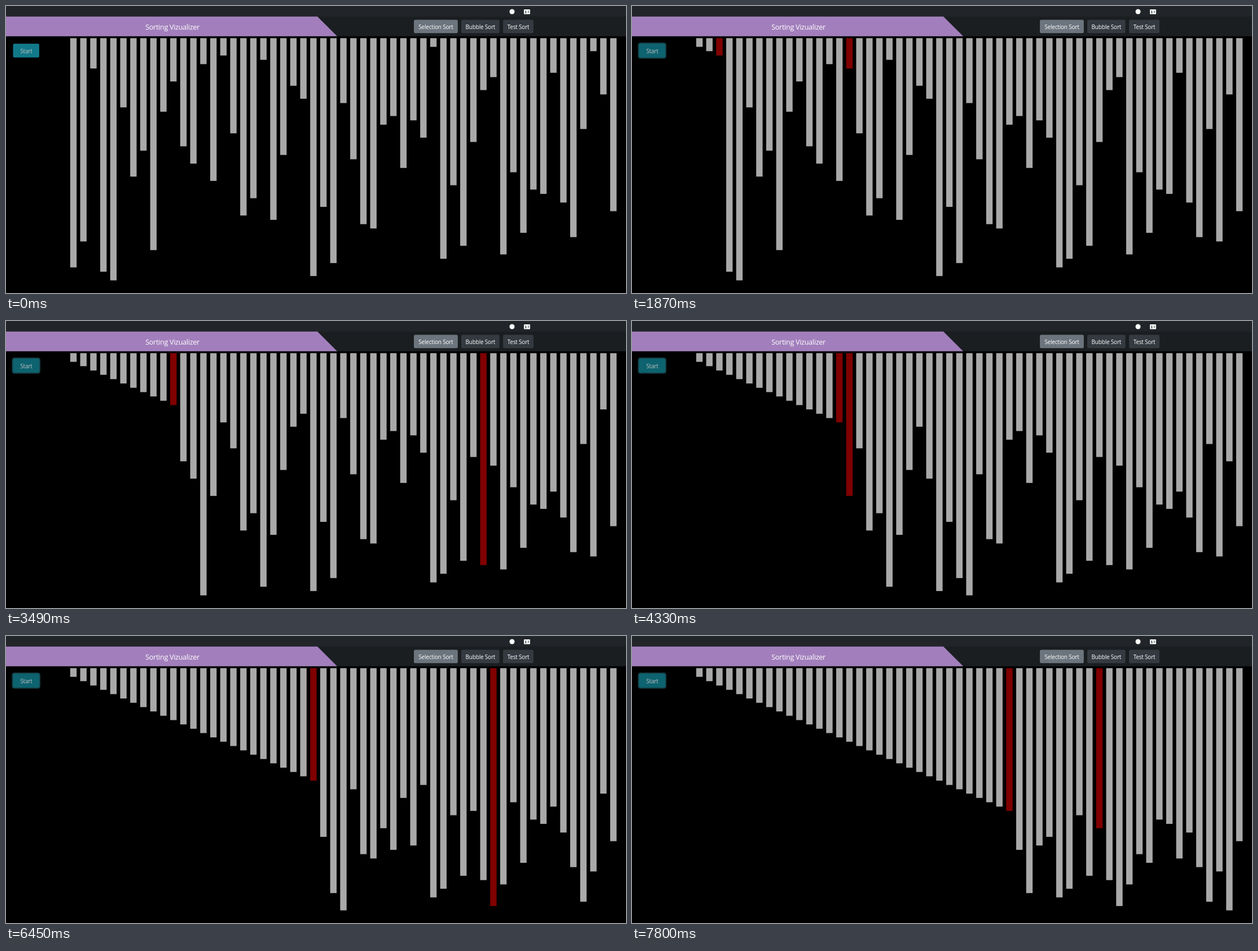
An HTML page that plays this animation: 1099x510 px, repeating every 8000 ms.

```html
<!DOCTYPE html>
<html lang="en">
<head>
<meta charset="utf-8">
<title>Sorting Vizualizer</title>
<style>
  html, body { margin: 0; width: 100%; height: 100%; overflow: hidden; background: #000; }
  svg { display: block; }
  text { font: 10px "Open Sans", "Noto Sans", sans-serif; letter-spacing: -.02em; fill: #fff; text-anchor: middle; }
  .title { font-size: 12.5px; }
  .cursor { fill: #fff; stroke: #000; stroke-linejoin: round; }
</style>
</head>
<body>
<svg width="1099" height="510" viewBox="0 0 1099 510">
  <rect width="1099" height="19" fill="#212529"/>
  <rect y="18.8" width="1099" height="35" fill="#1a1e21"/>
  <path d="M0 18.8H552L587 53.8H0Z" fill="#a27fbc"/>
  <text class="title" x="295" y="42">Sorting Vizualizer</text>

  <circle cx="897" cy="10" r="4.5" fill="#fff"/>
  <rect x="918" y="6" width="11" height="8.6" rx="1" fill="#fff"/>
  <g fill="#212529">
    <circle cx="921.3" cy="9.3" r="1.1"/>
    <path d="M919.5 12.6q0-1.5 1.8-1.5t1.8 1.5zM924.7 8.6h2.8v.6h-2.8zM924.7 10h2.8v.6h-2.8zM924.7 11.4h2.8v.6h-2.8z"/>
  </g>

  <g id="tabs"></g>

  <g opacity=".75">
    <rect id="ring" x="10.5" y="65" width="50.4" height="28.6" rx="4.5" fill="#1d5862"/>
    <rect id="start" x="12.5" y="67" width="46.4" height="24.6" rx="2.5"/>
    <text x="35.9" y="83.8">Start</text>
  </g>

  <g id="bars"></g>

  <path id="arrow" class="cursor" d="M0 0V11.5L2.7 9 4.5 13 6.4 12.2 4.7 8.3H8.2Z"/>
  <path id="hand" class="cursor" d="M-1.2 1Q0-.8 1.2 1V4.6L4.8 5.4Q6.3 5.8 6.3 7.4V10L5.2 12.4V14.5H-1.2V12.8L-4 9Q-4.3 7.2-2.8 7.4L-1.2 8.8Z"/>
</svg>
<script>
const LOOP = 8000;

// The unsorted input
const VALUES = [
  53, 47, 7, 54, 56, 16, 32, 26, 49, 17, 10, 25, 29, 6, 33, 4, 22, 41, 37,
  5, 42, 27, 11, 14, 55, 39, 52, 15, 28, 43, 44, 20, 18, 30, 19, 23, 2, 51,
  34, 48, 24, 12, 9, 50, 31, 45, 35, 36, 8, 38, 46, 21, 3, 13, 40
];
const FIRST_SWAP = 1373, SWAP_EVERY = 207.3;
const BAR = { left: 113.8, top: 57.2, pitch: 17.725, width: 11.35, unit: 7.685 };

const MOVE_START = 210, CLICK = 1220, LEAVE = 1400, STEP = 91.8;

const $ = id => document.getElementById(id);

function add(parent, tag, attributes) {
  const node = document.createElementNS('http://www.w3.org/2000/svg', tag);
  for (const name in attributes) node.setAttribute(name, attributes[name]);
  return parent.appendChild(node);
}

function addTab(label, x, width, fill) {
  add($('tabs'), 'rect', { x, y: 24.4, width, height: 23.8, rx: 2.5, fill });
  add($('tabs'), 'text', { x: x + width / 2, y: 40.5 }).textContent = label;
}
addTab('Selection Sort', 723, 77.8, '#6c757d');
addTab('Bubble Sort', 807, 67.7, '#343a40');
addTab('Test Sort', 881, 54, '#343a40');

const bars = VALUES.map((_, i) => add($('bars'), 'rect', {
  x: BAR.left + BAR.pitch * i, y: BAR.top, width: BAR.width
}));

// Selection sort, one swap per interval; the last swapped pair is red
function drawBars(time) {
  const list = [...VALUES];
  let active = [];
  for (let i = 0; FIRST_SWAP + i * SWAP_EVERY <= time; i++) {
    const min = list.indexOf(Math.min(...list.slice(i)));
    [list[i], list[min]] = [list[min], list[i]];
    active = [i, min];
  }
  bars.forEach((bar, i) => {
    bar.setAttribute('height', list[i] * BAR.unit);
    bar.setAttribute('fill', active.includes(i) ? '#800000' : '#a9a9a9');
  });
}

const bezier = (a, b, c, t) => (1 - t) ** 2 * a + 2 * t * (1 - t) * b + t * t * c;

function place(shape, visible, x, y) {
  shape.style.display = visible ? '' : 'none';
  shape.setAttribute('transform', `translate(${x} ${y})`);
}

// The pointer sweeps in past the button, swings back to click, then exits upwards
function drawPointer(time) {
  const t = Math.min(1, Math.floor((time - MOVE_START) / STEP) / 10);
  const leaving = time >= LEAVE;
  const x = leaving ? 50 : bezier(801, -190, 45.5, t);
  const y = leaving ? 32 : bezier(458, 70, 73.5, t);
  const visible = time >= MOVE_START && time < LEAVE + STEP;
  const hover = t > .85;
  place($('hand'), visible && hover && !leaving, x, y);
  place($('arrow'), visible && (!hover || leaving), x, y);
  $('start').setAttribute('fill', hover ? '#138496' : '#17a2b8');
  $('ring').style.display = time >= CLICK ? '' : 'none';
}

function frame() {
  const time = performance.now() % LOOP;
  drawBars(time);
  drawPointer(time);
  requestAnimationFrame(frame);
}
frame();
</script>
</body>
</html>
```
